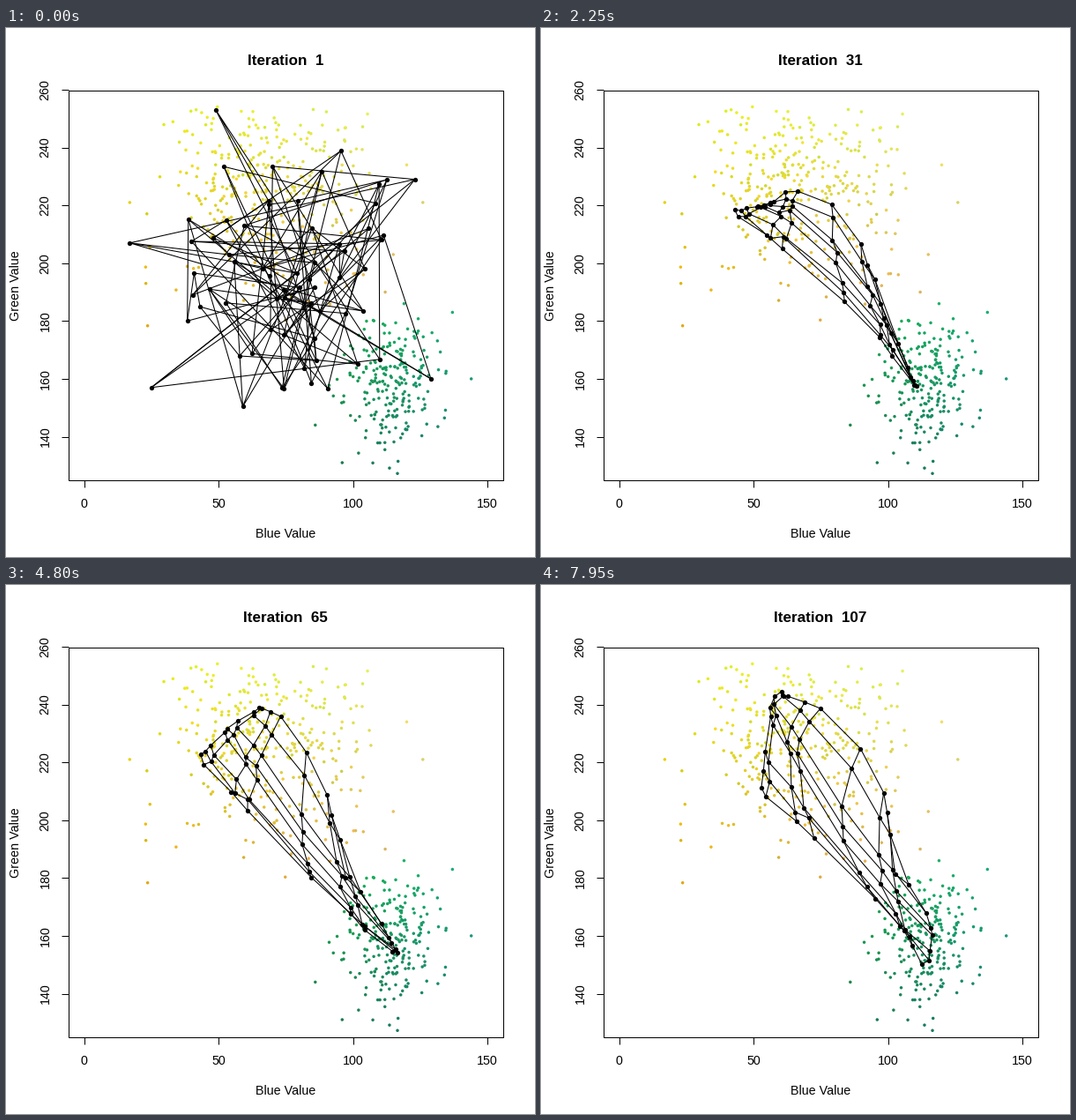
A matplotlib script for the animation above (8000 ms loop, 600x600 px).

```python
import numpy as np
import matplotlib.pyplot as plt
from matplotlib.animation import FuncAnimation
from matplotlib.collections import LineCollection
from matplotlib.patches import Rectangle

plt.rcParams["font.family"] = "Liberation Sans"
PX = 0.72  # points per pixel at 100 dpi
N = 8      # the map is an N x N grid of nodes
rng = np.random.default_rng(4)


def to_px(points):
    blue, green = np.transpose(points)
    return np.column_stack([88.5 + 3.05 * blue, 463.5 - 3.279 * (green - 140)])


def cloud(count, mean, sd, low, high, outliers=()):
    points = rng.normal(mean, sd, (count * 3, 2))
    inside = np.all((points > low) & (points < high), axis=1)
    return np.array([*outliers, *points[inside]])[:count]


yellow = cloud(335, (68, 227), (20, 19), (22, 178), (107, 255),
               [(17, 221), (23, 193), (120, 234), (126, 221), (115, 203), (112, 190)])
green = cloud(230, (114.5, 159), (10, 11), (90, 125), (136, 182),
              [(119, 186), (137, 183), (144, 160), (86, 144), (96, 131)])
start = to_px(cloud(N * N, (71, 195), (24, 24), (36, 150), (124, 240),
                    [(49, 253), (17, 207), (25, 157), (129, 160), (123, 229)]))
start = rng.permutation(start).reshape(N, N, 2)


def quadratic(t):
    """Weights of the curve through three points at t = 0, 1/2 and 1."""
    t = np.array(t)
    return np.column_stack([(1 - t) * (1 - 2 * t), 4 * t * (1 - t), t * (2 * t - 1)])


# uneven spacing bunches neighbouring nodes together
ACROSS = quadratic([0, .08, .18, .42, .5, .65, .88, 1])
ALONG = quadratic([0, .03, .13, .2, .5, .72, .8, 1])
UNEVEN = rng.normal(0, 2, (N, N, 2))

# lower edge, middle and upper edge of the sheet, each from yellow to green
KEY_STEPS = [15, 27, 53]
KEY_SHEETS = np.array([
    [[(217, 207), (345, 311), (425, 409)],
     [(245, 203), (335, 255), (423, 397)],
     [(258, 198), (330, 200), (401, 345)]],
    [[(213, 186), (338, 326), (441, 414)],
     [(249, 171), (335, 283), (434, 402)],
     [(290, 142), (335, 190), (385, 330)]],
    [[(249, 232), (379, 356), (433, 432)],
     [(260, 142), (342, 275), (444, 389)],
     [(273, 124), (362, 185), (405, 325)]],
], float)
CENTRE = np.array([350, 290])


def nodes_at(step):
    """Random nodes gather on a small sheet, which then unfolds over the data."""
    weights = [np.interp(step, KEY_STEPS, row) for row in np.eye(3)]
    control = np.tensordot(weights, KEY_SHEETS, 1)
    sheet = np.einsum("ia,jb,abk->ijk", ACROSS, ALONG, control) + UNEVEN
    sheet = CENTRE + (sheet - CENTRE) * (1 - .6 * np.exp(-(step / 7) ** 2))
    return sheet + (start - sheet) * np.exp(-step / 3.2)


fig = plt.figure(figsize=(6, 6), dpi=100, facecolor="white")
ax = fig.add_axes([0, 0, 1, 1])
ax.set(xlim=(0, 600), ylim=(600, 0))
ax.axis("off")

box = Rectangle((70.5, 70.5), 493.5, 442.5, fill=False, lw=PX, ec="black")
ax.add_patch(box)


def label(x, y, text, size=14.2, **style):
    return ax.text(x, y, text, fontsize=size * PX, ha="center",
                   **{"va": "center_baseline", **style})


def tick(x, y):
    ax.plot(x, y, color="black", lw=PX, solid_capstyle="butt")


for value in range(0, 151, 50):
    x = to_px([(value, 0)])[0, 0]
    tick([x, x], [513, 520.5])
    label(x, 539, str(value))
for value in range(140, 261, 20):
    y = to_px([(0, value)])[0, 1]
    tick([63, 70.5], [y, y])
    label(44.5, y, str(value), rotation=90, va="center")
label(317, 573, "Blue Value")
label(11, 292, "Green Value", rotation=90, va="center")
title = label(317, 35.5, "", 17, weight="bold")


def dots(points, red):
    # each dot wears the colour its own green and blue values describe
    colours = np.column_stack([red, .95 * points[:, 1], .84 * points[:, 0]])
    art = ax.scatter(*to_px(points).T, s=(3.5 * PX) ** 2, linewidths=0, zorder=1,
                     c=colours.clip(0, 255) / 255)
    art.set_clip_path(box)


dots(yellow, 224 + rng.normal(0, 9, len(yellow)))
dots(green, rng.normal(24, 5, len(green)))

mesh = LineCollection([], colors="black", linewidths=1.05 * PX, zorder=2)
ax.add_collection(mesh)
knots, = ax.plot([], [], "o", color="black", ms=5.3 * PX, mew=0, zorder=3)


def update(frame):
    step = frame // 3  # a new pose every 150 ms
    grid = nodes_at(step)
    mesh.set_segments([*grid, *grid.transpose(1, 0, 2)])
    knots.set_data(grid[..., 0].ravel(), grid[..., 1].ravel())
    title.set_text(f"Iteration  {1 + 2 * step}")
    return mesh, knots, title


anim = FuncAnimation(fig, update, frames=160, interval=50, repeat=True, repeat_delay=0)
plt.show()
```
